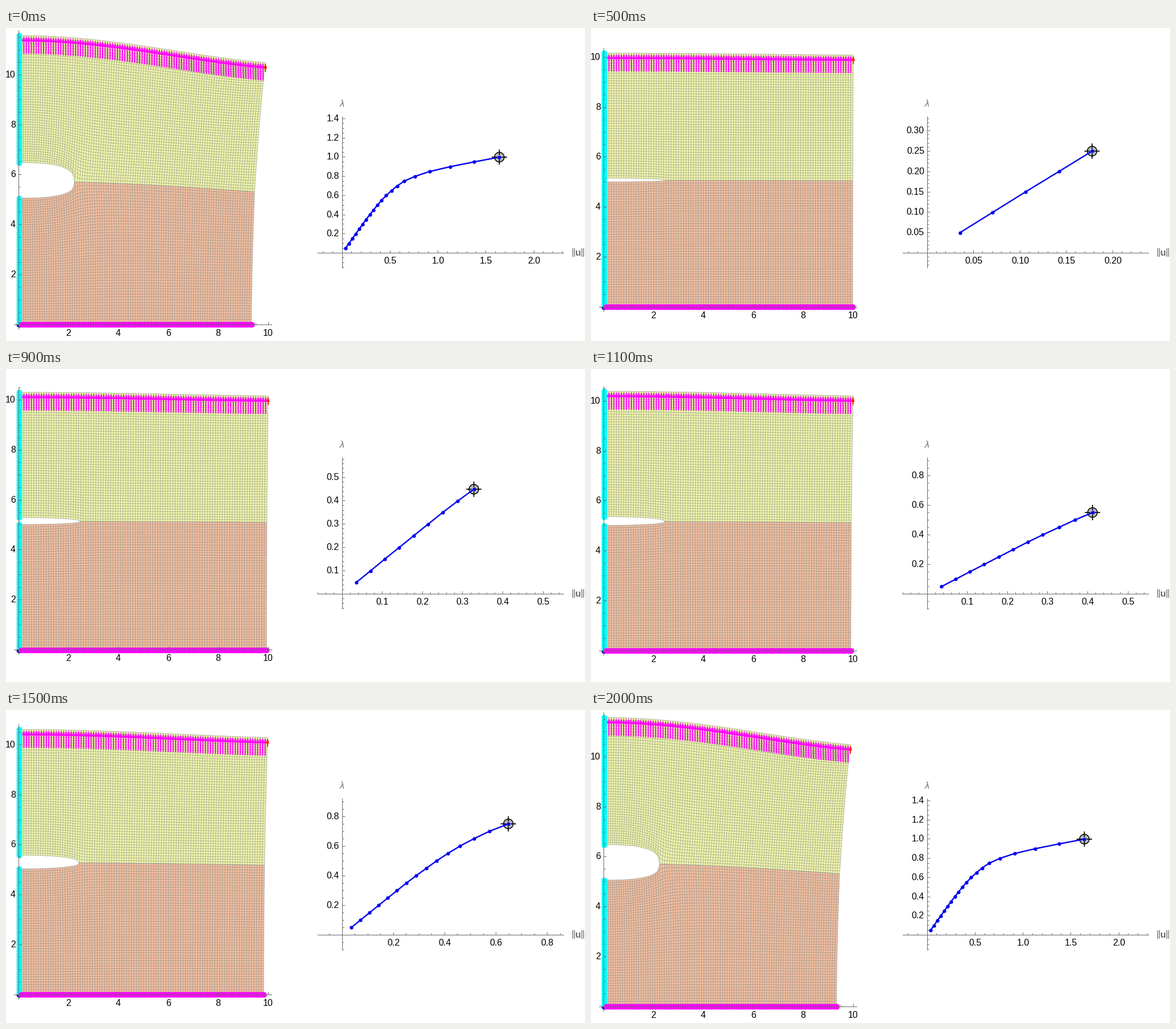
Animation of 1018x550 px, one loop 2.1 s. Source, as a matplotlib script:

```python
import math

import matplotlib.pyplot as plt
import numpy as np
from matplotlib.animation import FuncAnimation
from matplotlib.collections import LineCollection, PolyCollection

W, H = 1018, 550
STEPS = 20
PT = 0.72  # points per pixel at 100 dpi
GRAY = "#6a6a6a"
MAGENTA = "#ff00ff"

plt.rcParams["font.family"] = "Liberation Sans"
fig = plt.figure(figsize=(W / 100, H / 100), dpi=100, facecolor="white")
ax = fig.add_axes([0, 0, 1, 1])

# load steps and displacement norms
load = 0.05 * np.arange(1, STEPS + 1)
norm = np.array([0.0353, 0.0707, 0.106, 0.142, 0.1778, 0.2138, 0.250, 0.288,
                 0.3278, 0.3678, 0.4115, 0.459, 0.5135, 0.574, 0.648, 0.760,
                 0.912, 1.125, 1.374, 1.64])

# body: 10 x 10 units, 100 x 100 cells, slit of length TIP at mid height
N, SIZE, MID, TIP = 100, 10.0, 5.0, 2.5
UNIT, LEFT = 43.87, 22.8
xs = np.linspace(0, SIZE, N + 1)
hs = np.linspace(0, MID, N // 2 + 1)

modes = np.arange(N + 1)
cosines = np.cos(np.pi * np.outer(np.arange(N + 1), modes) / N)
to_modes = np.linalg.inv(cosines)
rate = np.maximum(modes * np.pi / SIZE * 0.7, 1e-6)
rise = np.sinh(np.outer(hs, rate)) / np.sinh(MID * rate)


def blend(low, high):
    """Smooth field between a bottom-edge and a top-edge profile."""
    a, b = to_modes @ low, to_modes @ high
    return (rise[::-1] * a + rise * b) @ cosines.T


def references(values):
    """Axis references: rescale once a value outgrows the last one."""
    out = []
    for v in values:
        if not out or v > 1.503 * out[-1]:
            out.append(v)
        else:
            out.append(out[-1])
    return out


x_refs, y_refs = references(norm), references(load)


def side_shift(y, r):
    """Horizontal displacement of the rows at heights y."""
    pull = 0.68 - 0.004 * y - 0.0052 * y ** 2
    t = xs / TIP
    notch = 0.13 * t * np.exp(1 - t)
    near = np.exp(-np.abs(y - MID) / 1.5)
    return -r ** 1.35 * (np.outer(pull, xs / SIZE) + np.outer(near, notch))


def deform(k):
    """Deformed node positions (x, y) of the lower and the upper block."""
    lam, u = load[k], norm[k]
    r = u / norm[-1]
    s = xs / SIZE
    top_left, top_right = 0.967 * u, 0.3 * lam + 0.2 * r
    sag = s ** 2 * (1.83 - 0.4 * s - 0.43 * s ** 2)
    top = top_left + (top_right - top_left) * sag

    tip = 0.71 * r
    end = 0.18 * lam + 0.14 * r
    d = np.clip((xs - TIP) / (SIZE - TIP), 0, 1)
    seam = tip + (end - tip) * d ** 1.4
    p = 2 + 0.8 * r
    gap = np.clip(1 - (xs / TIP) ** p, 0, 1) ** (1 / p)
    upper_face = seam + (0.908 * u - tip) * gap
    lower_face = seam + (0.04 * lam + 0.03 * r - tip) * gap

    low_y = hs[:, None] + blend(0 * xs, lower_face)
    up_y = MID + hs[:, None] + blend(upper_face, top)
    low_x = xs + side_shift(hs, r)
    up_x = xs + side_shift(MID + hs, r)
    return (low_x, low_y), (up_x, up_y)


def snap(v):
    return math.floor(v) + 0.5


def nice_step(span, most):
    for p in range(-3, 2):
        for m in (1, 2, 5):
            step = m * 10.0 ** p
            if span / step <= most:
                return step, (4 if m == 2 else 5)


def lines(segs, color, width, z, alpha=1):
    ax.add_collection(LineCollection(segs, colors=color, linewidths=width * PT,
                                     zorder=z, alpha=alpha, snap=False))


def label(x, y, text, ha="center", **kw):
    kw = {"size": 16 * PT, "color": "black", **kw}
    ax.text(x, y, text, ha=ha, va="center", zorder=20, **kw)


def dots(x, y, radius, color, z):
    ax.plot(x, y, "o", ms=2 * radius * PT, mec="none", mfc=color, zorder=z,
            snap=False)


def axis_x(x0, y0, scale, lo, hi, step, sub, fmt, drop, nudge=0):
    y = snap(y0)
    segs = [[(x0 + lo * scale, y), (x0 + hi * scale, y)]]
    small = step / sub
    for i in range(math.ceil(lo / small), math.floor(hi / small) + 1):
        x = snap(x0 + i * small * scale)
        major = i % sub == 0
        segs.append([(x, y), (x, y - (5 if major else 3))])
        if major and i > 0:
            label(x + nudge, y0 + drop, fmt % (i * small))
    lines(segs, GRAY, 1, 15)


def axis_y(x0, y0, scale, lo, hi, step, sub, fmt, gap):
    x = snap(x0)
    segs = [[(x, y0 - lo * scale), (x, y0 - hi * scale)]]
    small = step / sub
    for i in range(math.ceil(lo / small), math.floor(hi / small) + 1):
        y = snap(y0 - i * small * scale)
        major = i % sub == 0
        segs.append([(x, y), (x + (5 if major else 3), y)])
        if major and i > 0:
            label(x0 - gap, y, fmt % (i * small), ha="right")
    lines(segs, GRAY, 1, 15)


def arrows(x, y, length, color, z):
    y = y + 1
    stems = [[(a, b + 7), (a, b + length)] for a, b in zip(x, y)]
    heads = [[(a, b), (a - 2.9, b + 9.5), (a + 2.9, b + 9.5)]
             for a, b in zip(x, y)]
    lines(stems, color, 2, z)
    ax.add_collection(PolyCollection(heads, facecolors=color, snap=False,
                                     edgecolors="none", zorder=z))


def draw_block(x, y, fill):
    grid = np.stack([x, y], axis=-1)
    rim = np.concatenate([grid[0], grid[1:, -1], grid[-1, ::-1],
                          grid[::-1, 0]])
    ax.add_collection(PolyCollection([rim], facecolors=fill,
                                     edgecolors="none", zorder=1))
    rows = list(grid)
    cols = list(grid.transpose(1, 0, 2))
    lines(rows + cols, "#788588", 0.8, 2, alpha=0.6)


def draw_body(k):
    low, up = deform(k)
    height = up[1][-1, 0]
    base = 267.2 + UNIT / 2 * height

    def px(block):
        return LEFT + UNIT * block[0], base - UNIT * block[1]

    lx, ly = px(low)
    ux, uy = px(up)
    draw_block(lx, ly, "#f4be9e")
    draw_block(ux, uy, "#f1f4a9")

    arrows(ux[-1, 1:-1], uy[-1, 1:-1], 31, MAGENTA, 4)
    arrows(ux[-1, [0, -1]], uy[-1, [0, -1]], 15, "#ff1a00", 5)

    dots([LEFT], [base], 5, "#0000d0", 6)
    dots(lx[1:, 0], ly[1:, 0], 5, "#00ffff", 7)
    dots(ux[:, 0], uy[:, 0], 5, "#00ffff", 7)
    dots(lx[0, 1:], ly[0, 1:], 5, MAGENTA, 8)

    line = base - 0.2
    axis_x(LEFT, line, UNIT, -0.2, 10.15, 2, 4, "%.0f", 15, nudge=-1)
    axis_y(LEFT, line, UNIT, -0.2, height + 0.2, 2, 4, "%.0f", 6)


def draw_curve(k):
    x0, y0 = 591, 395.5
    x_span, y_span = 1.684 * x_refs[k], 1.675 * y_refs[k]
    sx, sy = 390 / x_span, 240 / y_span

    step, sub = nice_step(x_span, 7)
    fmt = "%.2f" if step < 0.09 else "%.1f"
    axis_x(x0, y0, sx, -43 / sx, x_span, step, sub, fmt, 14)
    step, sub = nice_step(y_span, 7.5)
    fmt = "%.2f" if step < 0.09 else "%.1f"
    axis_y(x0, y0, sy, -27 / sy, y_span, step, sub, fmt, 5)

    label(591, 133, "λ", color=GRAY, style="italic")
    label(1006, 395, "u", color=GRAY, weight="bold")
    lines([[(x, 387), (x, 402)] for x in (996.5, 999.5, 1012.5, 1015.5)],
          GRAY, 1.3, 15)

    px, py = x0 + sx * norm[:k + 1], y0 - sy * load[:k + 1]
    cx, cy = px[-1], py[-1]
    ax.add_patch(plt.Circle((cx, cy), 8.5, fc="#b8b8b8", ec="black",
                            lw=1.5 * PT, zorder=16))
    cross = []
    for dx, dy in ((1, 0), (-1, 0), (0, 1), (0, -1)):
        cross.append([(cx + 4 * dx, cy + 4 * dy),
                      (cx + 13.5 * dx, cy + 13.5 * dy)])
    lines(cross, "black", 1.7, 19)
    ax.plot(px, py, color="#0000f0", lw=2.4 * PT, zorder=17)
    dots(px, py, 3.2, "#0000f0", 18)


def draw(i):
    k = (i - 1) % STEPS
    ax.clear()
    ax.set_xlim(0, W)
    ax.set_ylim(H, 0)
    ax.axis("off")
    draw_body(k)
    draw_curve(k)
    return []


anim = FuncAnimation(fig, draw, frames=STEPS + 1, interval=100,
                     init_func=lambda: [], repeat=True, repeat_delay=0)
plt.show()
```
